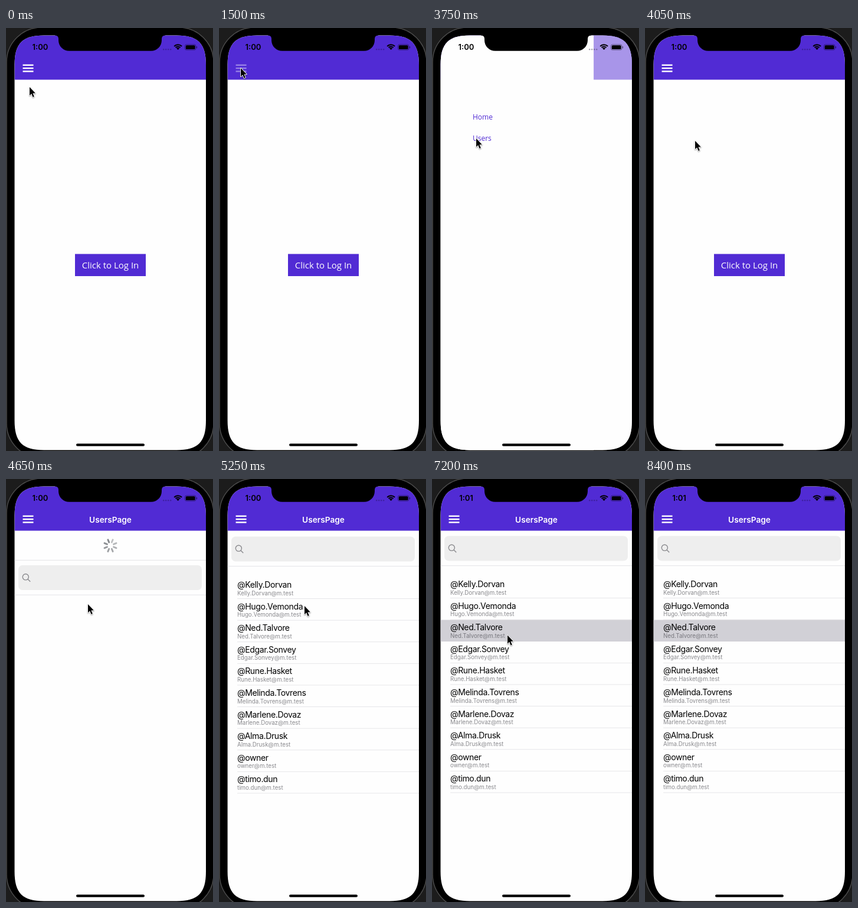
An HTML page with a canvas for the animation above (8950 ms loop, 351 by 716 pixels).

```html
<!DOCTYPE html>
<html lang="en">
<head>
<meta charset="utf-8">
<title>Users list on a phone</title>
<style>
  html, body { margin: 0; width: 100%; height: 100%; overflow: hidden; background: #1c1c1c; }
  canvas { display: block; width: 351px; height: 716px; }
</style>
</head>
<body>
<canvas id="stage"></canvas>
<script>
const W = 351, H = 716, LOOP = 8950, STEP = 150;
const PURPLE = '#512bd4', PAPER = '#fefefe', LINE = '#e4e4e7';
const screen = { x: 14.5, y: 12.5, w: 324.5, h: 702 };
const RIGHT = screen.x + screen.w, MID = 177, BAR = 87.5, PULL = 49.5;
const ROW_TOP = 165.3, ROW_H = 36.6;
const UI = 'Inter, Roboto, sans-serif', BODY = '"Open Sans", "Noto Sans", sans-serif';

const users = ['Kelly.Dorvan', 'Hugo.Vemonda', 'Ned.Talvore', 'Edgar.Sonvey', 'Rune.Hasket',
  'Melinda.Tovrens', 'Marlene.Dovaz', 'Alma.Drusk', 'owner', 'timo.dun'];

const at = { menu: 1500, open: 1690, close: 3800, page: 4200, list: 5100, minute: 5700 };
const rowTaps = [6150, 6750, 7200];

// Pointer moves: start, end, x, y; the pointer rests in between
const home = [40, 100];
const moves = [
  [150, 900, 37, 68],
  [2250, 3600, 75, 187],
  [3900, 4500, 139, 212],
  [4650, 5250, 145, 215],
  [5250, 5850, 126, rowY(0) + 19],
  [6150, 6450, 132, rowY(1) + 18],
  [6750, 6900, 128, rowY(2) + 26],
  [7200, 7500, 78, 173],
  [7650, 8400, 354, 722]
];

const canvas = document.getElementById('stage');
const ctx = canvas.getContext('2d');
const ratio = window.devicePixelRatio || 1;
canvas.width = W * ratio;
canvas.height = H * ratio;

const ramp = (t, from, to) => Math.min(1, Math.max(0, (t - from) / (to - from)));
const smooth = k => k * k * (3 - 2 * k);

function rowY(i) {
  return ROW_TOP + i * ROW_H;
}

function pointerAt(t) {
  let [x, y] = home;
  for (const [from, to, nx, ny] of moves) {
    const k = smooth(ramp(t, from, to));
    x += (nx - x) * k;
    y += (ny - y) * k;
  }
  return [x, y];
}

function rect(x, y, w, h, color) {
  ctx.fillStyle = color;
  ctx.fillRect(x, y, w, h);
}

function band(y, h, color) {
  rect(screen.x, y, screen.w, h, color);
}

function round(x, y, w, h, r, color) {
  ctx.beginPath();
  ctx.roundRect(x, y, w, h, r);
  ctx.fillStyle = color;
  ctx.fill();
}

function stroke(color, width, cap = 'butt') {
  ctx.strokeStyle = color;
  ctx.lineWidth = width;
  ctx.lineCap = cap;
  ctx.stroke();
}

function text(str, x, y, font, color, align = 'left', spacing = 0) {
  ctx.font = font;
  ctx.fillStyle = color;
  ctx.textAlign = align;
  ctx.letterSpacing = spacing + 'px';
  ctx.fillText(str, x, y);
}

// Rounded box whose corners ease into the straight sides
function smoothBox({ x, y, w, h }, size) {
  const pull = size * 0.27;
  const corners = [[x, y, 1, 1], [x + w, y, -1, 1], [x + w, y + h, -1, -1], [x, y + h, 1, -1]];
  ctx.beginPath();
  corners.forEach(([cx, cy, sx, sy], i) => {
    const side = [cx, cy + sy * size, cx, cy + sy * pull];
    const flat = [cx + sx * size, cy, cx + sx * pull, cy];
    const [a, b] = i % 2 ? [flat, side] : [side, flat];
    ctx.lineTo(a[0], a[1]);
    ctx.bezierCurveTo(a[2], a[3], b[2], b[3], b[0], b[1]);
  });
  ctx.closePath();
}

function drawHome() {
  rect(117, 382.5, 120, 37.5, PURPLE);
  text('Click to Log In', MID, 407, '15px ' + BODY, '#fff', 'center');
}

function drawSpinner(t, cy) {
  const head = Math.floor(t / 125);
  for (let i = 0; i < 8; i++) {
    const a = (i + 0.5) * Math.PI / 4, c = Math.cos(a), s = Math.sin(a);
    const age = ((head - i) % 8 + 8) % 8;
    ctx.globalAlpha = 1 - age * 0.07;
    ctx.beginPath();
    ctx.moveTo(MID + c * 6, cy + s * 6);
    ctx.lineTo(MID + c * 10.8, cy + s * 10.8);
    stroke('#85888c', 2.9, 'round');
  }
  ctx.globalAlpha = 1;
}

function drawSearch(shift) {
  round(21, 96.5 + shift, 311, 42, 7, '#eee');
  const y = 116.3 + shift;
  ctx.beginPath();
  ctx.arc(33.3, y, 5.1, 0, Math.PI * 2);
  ctx.moveTo(37, y + 3.7);
  ctx.lineTo(41.2, y + 7.9);
  stroke('#8a8a8e', 1.4);
  band(146.2 + shift, 1, LINE);
}

function drawList(shift, selected) {
  users.forEach((name, i) => {
    const y = rowY(i) + shift;
    if (i === selected) band(y, ROW_H, '#d1d0d6');
    else rect(31, y + ROW_H - 0.8, RIGHT - 31, 0.9, LINE);
    text('@' + name, 31, y + 17.7, '14px ' + UI, '#000', 'left', -0.35);
    text(name + '@m.test', 31, y + 30.3, '9.7px ' + UI, 'rgba(60,60,67,.6)');
  });
}

function drawUsers(t) {
  const loaded = t >= at.list;
  const shift = PULL * (1 - ramp(t, at.list - 120, at.list + 250)) ** 3;
  if (!loaded) {
    band(BAR + PULL, 1, LINE);
    drawSpinner(t, 112.7);
  }
  drawSearch(shift);
  if (loaded) drawList(shift, rowTaps.filter(tap => t >= tap).length - 1);
}

function drawBar(title, pressed) {
  band(screen.y, BAR - screen.y, PURPLE);
  for (let i = 0; i < 3; i++) {
    rect(28.5, 61.6 + i * 5.3, 18, 2.4, pressed ? 'rgba(255,255,255,.4)' : '#fff');
  }
  if (title) text(title, MID, 74.3, '600 13.7px ' + UI, '#fff', 'center');
}

function drawFlyout(open) {
  if (!open) return;
  band(screen.y, H, `rgba(255,255,255,${open / 2})`);
  const width = screen.w * 0.8, x = (open - 1) * width;
  rect(screen.x + x, screen.y, width, H, PAPER);
  ['Home', 'Users'].forEach((item, i) => {
    text(item, 69 + x, 154.7 + i * ROW_H, '12px ' + BODY, PURPLE);
  });
}

function drawStatus(t, open) {
  text(t < at.minute ? '1:00' : '1:01', 58, 37.3, '600 13px ' + UI, '#000', 'center');
  for (let i = 0; i < 4; i++) {
    round(266 + i * 4, 35, 2.4, 2.4, 1.2, open ? 'rgba(60,50,90,.45)' : 'rgba(0,0,0,.25)');
  }
  for (let i = 0; i < 3; i++) {
    ctx.beginPath();
    ctx.arc(291.6, 37, 2 + i * 3.4, -Math.PI * 0.76, -Math.PI * 0.24);
    stroke('#000', i ? 2 : 3);
  }
  ctx.beginPath();
  ctx.roundRect(303.4, 27.9, 18.6, 9.4, 2.8);
  stroke('rgba(0,0,0,.45)', 0.9);
  round(304.8, 29.2, 15.8, 6.8, 1.6, '#000');
  round(322.9, 31, 1.2, 3.4, 0.6, 'rgba(0,0,0,.5)');
}

function drawNotch() {
  const l = 89, r = 264, top = screen.y, bottom = 38.8, ear = 6, c = 18;
  ctx.beginPath();
  ctx.moveTo(l - ear, top - 1);
  ctx.lineTo(l - ear, top);
  ctx.quadraticCurveTo(l, top, l, top + ear);
  ctx.arcTo(l, bottom, l + c, bottom, c);
  ctx.arcTo(r, bottom, r, top + ear, c);
  ctx.lineTo(r, top + ear);
  ctx.quadraticCurveTo(r, top, r + ear, top);
  ctx.lineTo(r + ear, top - 1);
  ctx.fillStyle = '#000';
  ctx.fill();
}

function drawPointer([x, y]) {
  ctx.save();
  ctx.translate(x, y);
  ctx.beginPath();
  [[0, 0], [0, 14.2], [3.2, 11.3], [5.6, 17], [7.8, 16], [5.4, 10.5], [9.8, 10.3]]
    .forEach(p => ctx.lineTo(...p));
  ctx.closePath();
  ctx.lineJoin = 'round';
  ctx.shadowColor = 'rgba(0,0,0,.4)';
  ctx.shadowBlur = 2 * ratio;
  ctx.shadowOffsetY = ratio;
  stroke('#fff', 1.8);
  ctx.shadowColor = 'transparent';
  ctx.fillStyle = '#000';
  ctx.fill();
  ctx.restore();
}

function draw(t) {
  const open = ramp(t, at.open, at.open + 200) - ramp(t, at.close, at.close + 200);
  const onUsers = t >= at.page;

  ctx.setTransform(ratio, 0, 0, ratio, 0, 0);
  rect(0, 0, W, H, '#1c1c1c');
  round(1, -1, 351, 729, 59, '#000');
  stroke('#4c4c4c', 1.4);

  ctx.save();
  smoothBox(screen, 50);
  ctx.clip();
  rect(0, 0, W, H, PAPER);
  if (onUsers) drawUsers(t);
  else drawHome();
  drawBar(onUsers ? 'UsersPage' : '', t >= at.menu && t < at.open);
  drawFlyout(open);
  drawStatus(t, open);
  round(119, 703.6, 116, 4.2, 2.1, '#000');
  ctx.restore();

  drawNotch();
  drawPointer(pointerAt(t));
}

function tick() {
  const t = performance.now() % LOOP;
  draw(Math.floor(t / STEP) * STEP);
  requestAnimationFrame(tick);
}
tick();
</script>
</body>
</html>
```
